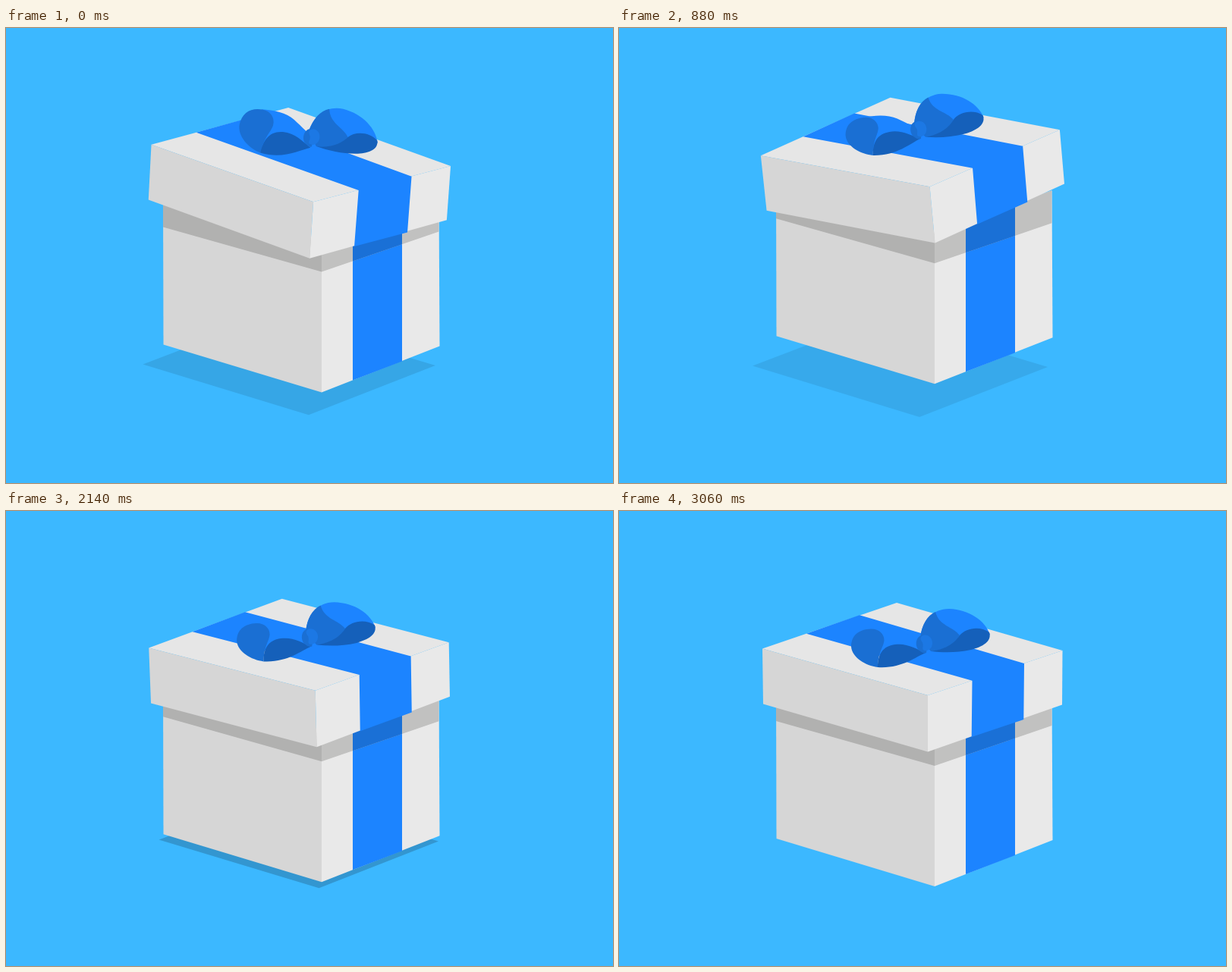
Animation of 800x600 px, one loop 3360 ms. Source, as an HTML page with a canvas:

```html
<!DOCTYPE html>
<html lang="en">
<head>
<meta charset="utf-8">
<title>Gift box</title>
<style>
html, body { margin: 0; width: 100%; height: 100%; overflow: hidden; background: #3cb8ff; }
canvas { display: block; width: 800px; height: 600px; }
</style>
</head>
<body>
<canvas id="stage" width="800" height="600"></canvas>
<script>
const ctx = document.getElementById('stage').getContext('2d');
const LOOP = 3360, STEP = 20;
const BLUE = '#1c84ff', MID = '#1a6fd3', DEEP = '#1560ba', RIGHT = '#e9e9e9', LEFT = '#d6d6d6';

const mix = (a, b, k) => a + (b - a) * k;
const clamp = x => Math.max(0, Math.min(1, x));
const smooth = (a, b, x) => { const u = clamp((x - a) / (b - a)); return u * u * (3 - 2 * u); };
const easeOut = u => u * (2 - u);
const bump = x => Math.max(0, 1 - x * x) ** 2;
const rad = deg => deg * Math.PI / 180;

// Quick rise, then a soft return between hold and end
const pulse = (t, rise, hold, end) => easeOut(clamp(t / rise)) * (1 - smooth(hold, end, t));

// Slow hop: the lid flies up and leans left
const hopLeft = t => ({
  lift: 30.5 * pulse(t, 200, 200, 600),
  gap: 6 * bump((t - 280) / 260),
  tilt: -5.7 * pulse(t, 150, 250, 560)
});

// Short hop: the lid leans right and lags behind the box
const hopRight = t => ({
  lift: 31 * pulse(t, 130, 130, 320),
  gap: .7 * bump((t - 35) / 40) - 7.5 * bump((t - 90) / 60),
  tilt: 3.75 * pulse(t, 35, 30, 310)
});

function pose(t) {
  const hops = [hopRight(t + 35), hopLeft(t - 580), hopLeft(t - 2120), hopRight(t - 2570)];
  const sum = key => hops.reduce((n, h) => n + h[key], 0);
  return { lift: Math.max(...hops.map(h => h.lift)), gap: sum('gap'), tilt: sum('tilt') };
}

function poly(fill, ...p) {
  ctx.beginPath();
  for (let i = 0; i < p.length; i += 2) ctx.lineTo(p[i], p[i + 1]);
  ctx.closePath();
  ctx.fillStyle = fill;
  ctx.fill();
}

function shape(fill, d) {
  ctx.fillStyle = fill;
  ctx.fill(new Path2D(d));
}

function drawShadow(lift) {
  const s = Math.max(clamp(lift * .03), smooth(1.5, 18.5, lift));
  poly(`rgba(30,70,100,${mix(.34, .13, s)})`,
    mix(207, 176, s), mix(431, 445.5, s), mix(416, 396, s), mix(494, 513, s),
    mix(571, 565, s), mix(433, 447, s), mix(362, 345, s), mix(372, 381, s));
}

function drawBody(lift) {
  ctx.save();
  ctx.translate(0, -lift);
  poly(LEFT, 207, 236, 416, 295, 416, 495, 207.5, 432);
  poly(RIGHT, 416, 295, 570.5, 240, 571.5, 434, 416, 495);
  poly(BLUE, 457, 281, 522, 257, 522, 454, 457, 479);
  poly('#b1b1b0', 207, 236, 416, 295, 416, 336, 207, 277);
  poly('#c1c1c0', 416, 295, 570.5, 240, 570.5, 283, 416, 336);
  poly('#1a70d6', 457, 281, 522, 257, 522, 299.7, 457, 322);
  ctx.restore();
}

function drawBow(tilt) {
  const up = tilt > 0;
  ctx.save();
  // The bow is looser than the lid: it lifts and turns on its own
  ctx.translate(403 - (up ? .9 : -.6) * tilt, 175 + (up ? -4.4 : 1.55) * tilt);
  ctx.rotate(rad((up ? 2.4 : -.5) * tilt));
  // left loop, stretched while it swings up
  ctx.save();
  ctx.scale(1, 1 + .03 * Math.max(0, tilt));
  ctx.translate(-403, -175);
  shape(BLUE, 'M330 155.5C346 153 363 153 375 159C388 166 396 170 402 174L403 187L345 195Z');
  shape(MID, 'M306 179C306 164 316 156 332 155.5C342 155 350 162 349.5 171C348 181 342 185 341 206C325 204 307 193 306 179Z');
  shape(DEEP, 'M341 206C341 190 347 178 364 176C380 174 392 182 404 187C390 193 372 208 341 206Z');
  ctx.restore();
  // right loop
  ctx.translate(-403, -175);
  shape(BLUE, 'M397 168C399 145 413 129 435 129C462 130 483 145 489 163L447 172L412 185Z');
  shape(MID, 'M397 168C399 150 406 138 417 133C422 152 440 152 449 164C443 176 430 183 411 185Z');
  shape(DEEP, 'M411 185C433 182 443 173 449 164C457 154 476 151 488 160C492 172 479 179 464 183C446 187 428 187 411 185Z');
  // knot
  shape(MID, 'M399 164C390 166 390 180 396 184C399 187 403 188 405 187L408 166Z');
  shape('#1c78e4', 'M399 165C405 161 413 166 413 174C413 181 408 185 402 184C398 182 403 177 399 172C397 169 397 167 399 165Z');
  ctx.restore();
}

function drawLid(lift, tilt) {
  ctx.save();
  ctx.translate(386.5, 214 - lift);
  ctx.rotate(rad(tilt));
  ctx.translate(-386.5, -214);
  poly('#e6e6e6', 189, 181.5, 366, 121, 584.5, 184, 407, 243);
  poly(LEFT, 189, 181.5, 407, 243, 407, 317.5, 190, 254.5);
  poly(RIGHT, 407, 243, 584.5, 184, 584, 255.5, 407, 317.5);
  poly(BLUE, 247, 161.7, 317, 137.3, 534, 201, 533.3, 275, 464.7, 298, 465.5, 223.7);
  drawBow(tilt);
  ctx.restore();
}

function draw(t) {
  const { lift, gap, tilt } = pose(t);
  ctx.fillStyle = '#3cb8ff';
  ctx.fillRect(0, 0, 800, 600);
  drawShadow(lift);
  drawBody(lift);
  drawLid(lift + gap, tilt);
}

const start = performance.now();
function frame() {
  const t = Math.max(0, performance.now() - start) % LOOP;
  draw(Math.floor(t / STEP) * STEP);
  requestAnimationFrame(frame);
}
frame();
</script>
</body>
</html>
```
